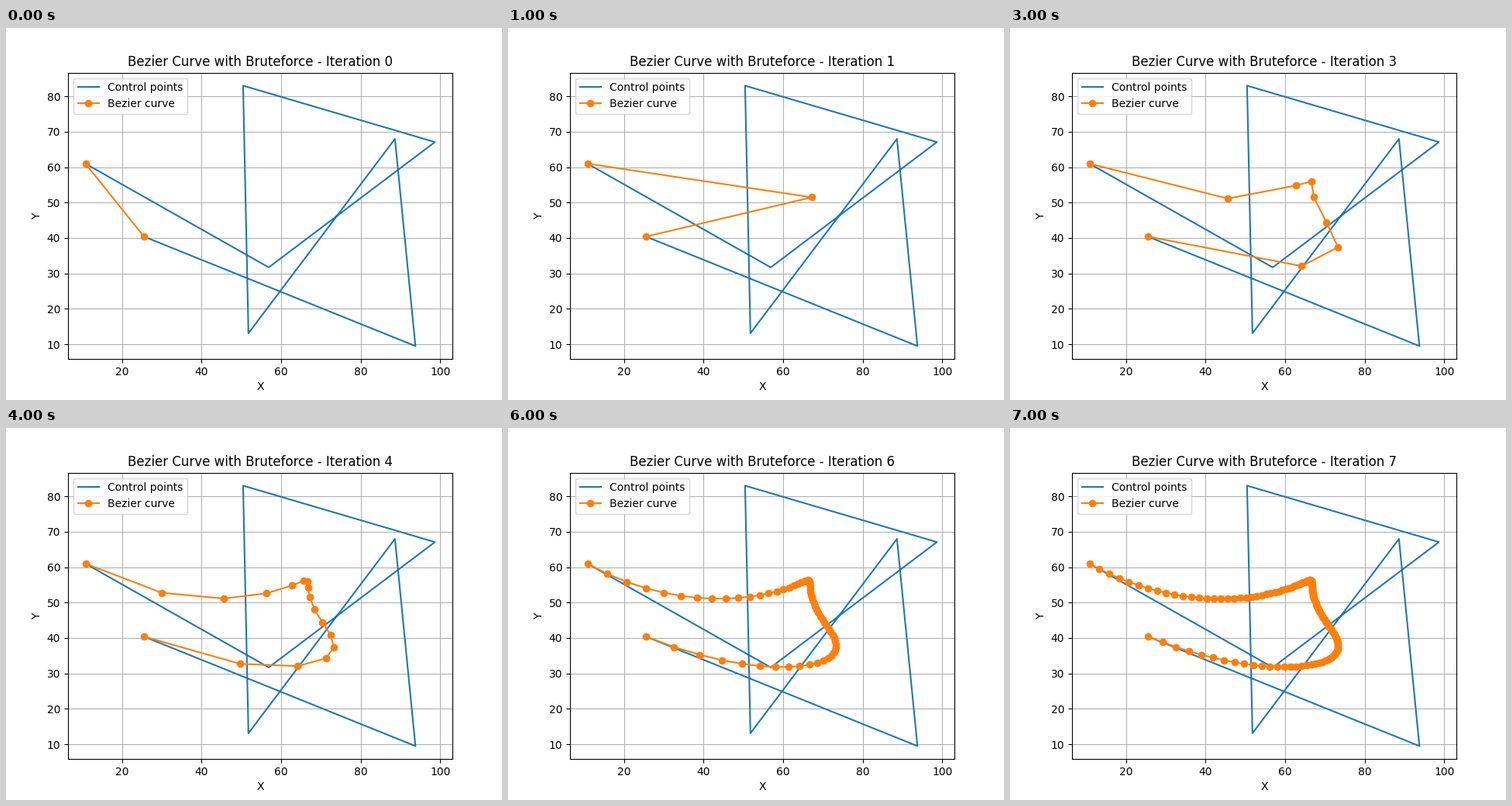
Write a matplotlib script that moves like this. It is 640 px wide and 480 px high and loops after 8 s.

```python
from math import comb

import matplotlib.pyplot as plt
import numpy as np
from matplotlib.animation import FuncAnimation

CONTROL = np.array([
    (10.8, 61.0), (56.87, 31.7), (98.65, 67.1), (50.42, 83.03),
    (51.77, 13.1), (88.6, 68.0), (93.75, 9.48), (25.5, 40.4),
])
ITERATIONS = 8


def bezier(control, t):
    """Evaluate the Bezier curve of the control points at parameters t."""
    n = len(control) - 1
    basis = [comb(n, k) * t**k * (1 - t)**(n - k) for k in range(n + 1)]
    return np.transpose(basis) @ control


fig, ax = plt.subplots(figsize=(6.4, 4.8), dpi=100)
ax.plot(*CONTROL.T, label="Control points")
curve, = ax.plot(*CONTROL[[0, -1]].T, marker="o", label="Bezier curve")
ax.set_xlabel("X")
ax.set_ylabel("Y")
ax.grid(True)
ax.legend(loc="upper left")
title = ax.set_title("")


def update(iteration):
    # Every iteration halves the parameter step.
    t = np.linspace(0, 1, 2**iteration + 1)
    curve.set_data(*bezier(CONTROL, t).T)
    title.set_text(f"Bezier Curve with Bruteforce - Iteration {iteration}")
    return curve, title


anim = FuncAnimation(fig, update, frames=ITERATIONS, interval=1000,
                     repeat=True, repeat_delay=0)
plt.show()
```
